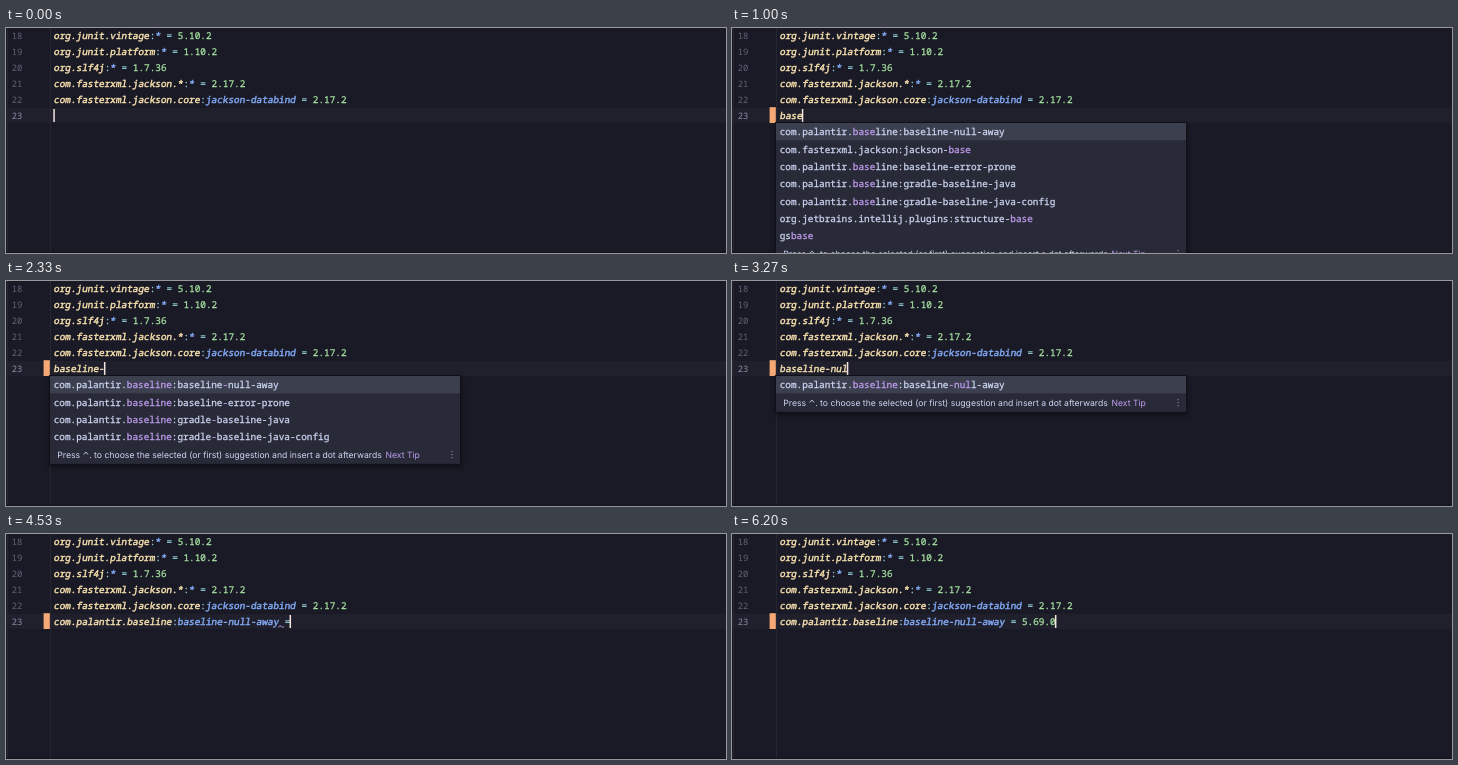
Animation, 720 px wide and 225 px high, one loop 6270 ms. Source, as an HTML page with a canvas:

```html
<!DOCTYPE html>
<html lang="en">
<head>
<meta charset="utf-8">
<title>Dependency completion</title>
<style>
html, body { margin: 0; width: 100%; height: 100%; overflow: hidden; background: #1a1a26; }
canvas { display: block; width: 720px; height: 225px; }
</style>
</head>
<body>
<canvas id="stage"></canvas>
<script>
const W = 720, H = 225, LOOP = 6270;
const CW = 5.625, LINE = 15.88, ROW = 17.33, LEFT = 48;
const MONO = '"Noto Sans Mono", "DejaVu Sans Mono", monospace';
const SANS = 'Inter, Roboto, sans-serif';
const C = {
  bg: '#1a1a26', line: '#20202d', rule: '#262633', num: '#606276', numOn: '#8a8ea6',
  key: '#f9e2af', op: '#94d4dc', name: '#82aaf6', value: '#a6e3a1',
  mark: '#f6a974', caret: '#f5e6df', popup: '#292a37', pick: '#3b3f4e',
  text: '#cdd6f4', match: '#c09df0', edge: '#10101a', dots: '#7c8095'
};

const LINES = [
  'org.junit.vintage:* = 5.10.2',
  'org.junit.platform:* = 1.10.2',
  'org.slf4j:* = 1.7.36',
  'com.fasterxml.jackson.*:* = 2.17.2',
  'com.fasterxml.jackson.core:jackson-databind = 2.17.2'
];
const ITEMS = [
  'com.palantir.baseline:baseline-null-away',
  'com.fasterxml.jackson:jackson-base',
  'com.palantir.baseline:baseline-error-prone',
  'com.palantir.baseline:gradle-baseline-java',
  'com.palantir.baseline:gradle-baseline-java-config',
  'org.jetbrains.intellij.plugins:structure-base',
  'org.revapi:revapi-basic-features',
  'gsbase'
];
const QUERY = 'baseline-nul';
const KEYS = [200, 330, 470, 800, 1070, 1330, 1530, 1800, 2130, 2470, 2870, 3130];
const ACCEPT = 3330, SPACE = 3600, EQUALS = 3870, SPACE2 = 4670, OFFER = 4800, DONE = 5600;
const VERSION = '5.69.0';

const canvas = document.getElementById('stage');
const ctx = canvas.getContext('2d');
const dpr = window.devicePixelRatio || 1;
canvas.width = W * dpr;
canvas.height = H * dpr;

function box(x, y, w, h, color) {
  ctx.fillStyle = color;
  ctx.fillRect(x, y, w, h);
}

// A thin outline thickens the regular weight; a skew makes the slanted style.
function mono(text, x, y, color, slanted) {
  ctx.font = `500 9.375px ${MONO}`;
  ctx.lineWidth = slanted ? 0.45 : 0.28;
  ctx.lineJoin = 'round';
  [...text].forEach((ch, i) => {
    ctx.save();
    ctx.translate(x + i * CW - (slanted ? 0.4 : 0), y);
    if (slanted) ctx.transform(1, 0, -0.16, 1, 0, 0);
    ctx.fillStyle = ctx.strokeStyle = typeof color === 'function' ? color(i) : color;
    ctx.fillText(ch, 0, 0);
    ctx.strokeText(ch, 0, 0);
    ctx.restore();
  });
}

function sans(text, x, y, color) {
  ctx.font = `400 8.65px ${SANS}`;
  ctx.fillStyle = color;
  ctx.fillText(text, x, y);
}

function entry(text, y) {
  const [, group, colon, name, eq, value] = text.match(/^([^:]*)(:?)([^\s]*)(\s*=?\s*)(.*)$/);
  let x = LEFT;
  const part = (s, color, slanted) => {
    mono(s, x, y, color, slanted);
    x += s.length * CW;
  };
  part(group, C.key, true);
  part(colon, C.op);
  part(name, C.name, true);
  part(eq, C.op);
  part(value, C.value);
}

const split = query => [query.slice(0, 8), query.slice(8)];

function matches(item, query) {
  return split(query).every(s => item.includes(s));
}

// Tells which letters of the item belong to the query.
function hitTest(item, query) {
  const [head, tail] = split(query);
  const a = item.indexOf(head), aEnd = a + head.length;
  const b = item.indexOf(tail, aEnd);
  return k => (k >= a && k < aEnd) || (k >= b && k < b + tail.length);
}

function popup(x, items, query) {
  const top = 95, w = 410, h = items.length * ROW + 18.5;
  ctx.save();
  ctx.shadowColor = 'rgba(0,0,0,.45)';
  ctx.shadowBlur = 5;
  ctx.shadowOffsetY = 2;
  box(x - 1, top - 1, w + 2, h + 2, C.edge);
  ctx.restore();
  box(x, top, w, h, C.popup);
  box(x, top, w, ROW, C.pick);
  items.forEach((item, i) => {
    const hit = hitTest(item, query);
    mono(item, x + 3.7, top + 12.4 + i * ROW, k => hit(k) ? C.match : C.text);
  });
  const base = top + items.length * ROW + 12.4;
  sans('Press \u2303. to choose the selected (or first) suggestion and insert a dot afterwards', x + 7.3, base, C.text);
  sans('Next Tip', x + 335.5, base, C.match);
  for (let i = -1; i <= 1; i++) box(x + 401.5, base - 3.7 + i * 3, 1.2, 1.2, C.dots);
}

function squiggle(x, y) {
  ctx.strokeStyle = C.match;
  ctx.lineWidth = 0.9;
  ctx.beginPath();
  ctx.moveTo(x, y + 1);
  ctx.quadraticCurveTo(x + 1.4, y - 2, x + 2.8, y);
  ctx.quadraticCurveTo(x + 4.2, y + 2, x + 5.6, y);
  ctx.stroke();
}

function typed(t) {
  if (t < ACCEPT) return QUERY.slice(0, KEYS.filter(k => t >= k).length);
  let s = ITEMS[0];
  if (t >= SPACE) s += ' ';
  if (t >= EQUALS) s += '=';
  if (t >= SPACE2) s += ' ';
  if (t >= DONE) s += VERSION;
  return s;
}

function draw(t) {
  ctx.setTransform(dpr, 0, 0, dpr, 0, 0);
  ctx.textBaseline = 'alphabetic';
  ctx.textRendering = 'geometricPrecision';
  box(0, 0, W, H, C.bg);
  box(0, 80, W, 15, C.line);
  box(44, 0, 1, H, C.rule);
  box(1, 0, 1, H, C.rule);
  box(0, 224, W, 1, '#12121c');

  const text = typed(t);
  for (let i = 0; i < 6; i++) {
    const y = 11.4 + i * LINE;
    ctx.font = `500 8.9px ${MONO}`;
    ctx.fillStyle = i === 5 ? C.numOn : C.num;
    ctx.fillText(18 + i, 5.7, y);
    entry(i < 5 ? LINES[i] : text, y);
  }
  if (text) box(37.6, 79.2, 6.2, 15.8, C.mark);
  if (t >= EQUALS && t < DONE) squiggle(LEFT + 40 * CW - 0.5, 92.4);
  box(LEFT + text.length * CW - 0.7, 81, 1.5, 13, C.caret);

  if (text && t < ACCEPT) {
    popup(44, ITEMS.filter(s => matches(s, text)), text);
  } else if (t >= OFFER && t < DONE) {
    popup(286, [VERSION], '');
  }
}

const start = performance.now();
function tick() {
  draw((performance.now() - start) % LOOP);
  requestAnimationFrame(tick);
}
tick();
</script>
</body>
</html>
```
